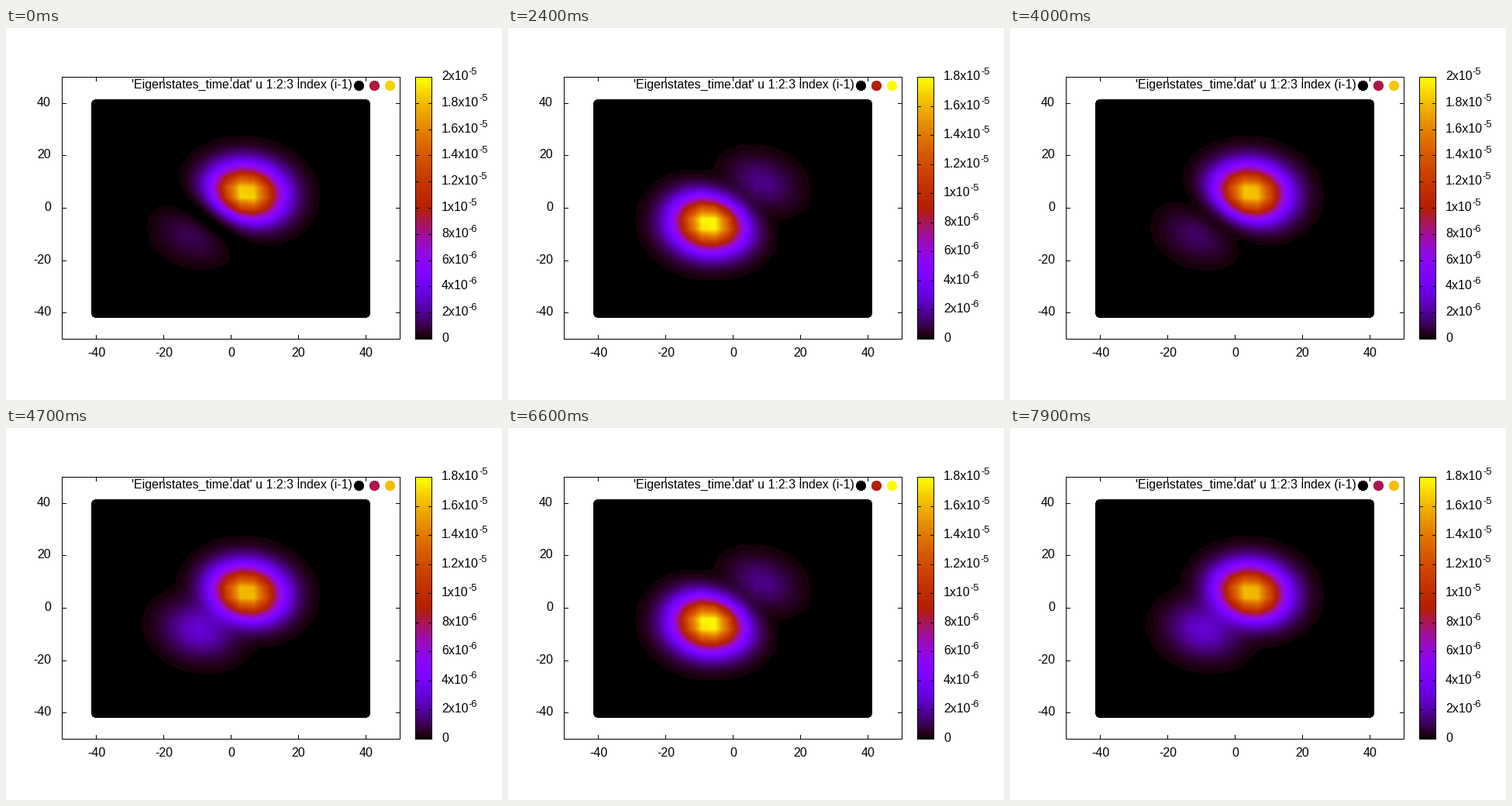
Recreate the animation shown at these times as a matplotlib script. Size 640 by 480 pixels, loop 8 s.

```python
import numpy as np
import matplotlib.pyplot as plt
from matplotlib.animation import FuncAnimation
from matplotlib.patches import Circle, Rectangle

W, H, DPI = 640, 480, 100
FRAMES, INTERVAL, PERIOD = 80, 100, 42
LEFT, RIGHT, TOP, BOTTOM = 72, 508, 63, 401
BAR_L, BAR_R = 528, 549
PEAK, STEP = 1.873e-5, 2e-6
LEVELS = 128
PX = 72 / DPI

plt.rcParams["font.family"] = "Liberation Sans"


def to_px(x):
    return LEFT + (x + 50) * (RIGHT - LEFT) / 100


def to_py(y):
    return BOTTOM - (y + 50) * (BOTTOM - TOP) / 100


def palette(v):
    """Black - violet - red - yellow ramp in discrete levels."""
    v = np.clip(np.floor(np.asarray(v) * LEVELS) / (LEVELS - 1), 0, 1)
    blue = np.clip(np.sin(2 * np.pi * v), 0, 1)
    return np.stack([np.sqrt(v), v ** 3, blue], axis=-1)


def well_state(x, y):
    """State localised in the upper right well, with a weak opposite lobe."""
    u, v = (x + y) / np.sqrt(2), (x - y) / np.sqrt(2)
    main = np.exp(-((u - 6.4) ** 2 + v ** 2) / 206)
    lobe = np.exp(-((u + 8) ** 2 + v ** 2) / 214)
    return main - 0.4 * lobe


def hat(points, nodes):
    gap = nodes[1] - nodes[0]
    return np.clip(1 - np.abs(points[:, None] - nodes) / gap, 0, 1)


# Density area in pixels; overlapping round markers shift the picture left
DOT = 6
x0, x1 = round(to_px(-40)), round(to_px(40))
y0, y1 = round(to_py(40)), round(to_py(-40))
cols = np.arange(x0 - DOT, x1 + DOT)
rows = np.arange(y0 - DOT + 1, y1 + DOT + 1)
data_x = np.clip((cols + 5.5 - to_px(0)) / 4.36, -40, 40)
data_y = np.clip((to_py(0) - rows) / 3.38, -40, 40)

nodes = np.arange(-40, 41, 4.0)
coarse = well_state(nodes[None, :], nodes[:, None])
wx, wy = hat(data_x, nodes), hat(data_y, nodes)
right = (wy @ coarse @ wx.T) ** 2
left = (wy @ coarse[::-1, ::-1] @ wx.T) ** 2
right *= PEAK / right.max()
left *= PEAK / left.max()


def overshoot(p):
    return np.maximum(0, np.maximum(p[0] + DOT - 0.5 - p, p - p[-1] + DOT - 0.5))


outside = np.hypot(overshoot(cols)[None, :], overshoot(rows)[:, None]) > DOT

fig = plt.figure(figsize=(W / DPI, H / DPI), dpi=DPI, facecolor="white")
ax = fig.add_axes([0, 0, 1, 1])
ax.set_axis_off()


def text(x, y, s, ha="left"):
    return ax.text(x, y, s, ha=ha, va="baseline", fontsize=16 * PX, color="black")


def line(xa, ya, xb, yb):
    """Straight one pixel line, both ends included."""
    xa, xb = sorted((xa, xb))
    ya, yb = sorted((ya, yb))
    return ax.add_patch(Rectangle((xa, ya), xb - xa + 1, yb - ya + 1, lw=0,
                                  fc="black", antialiased=False, snap=False,
                                  zorder=2.5))


def frame_box(xa, ya, xb, yb):
    for y in (ya, yb):
        line(xa, y, xb, y)
    for x in (xa, xb):
        line(x, ya, x, yb)


def picture(rgb, xa, xb, ya, yb):
    return ax.imshow(rgb, extent=(xa, xb, yb, ya), interpolation="nearest",
                     aspect="auto", zorder=1)


density = picture(np.ones(right.shape + (3,)),
                  cols[0], cols[-1] + 1, rows[0], rows[-1] + 1)
ramp = np.linspace(1, 0, BOTTOM - TOP + 1)[:, None]
picture(palette(ramp), BAR_L, BAR_R + 1, TOP, BOTTOM + 1)
ax.set_xlim(0, W)
ax.set_ylim(H, 0)

frame_box(LEFT, TOP, RIGHT, BOTTOM)
frame_box(BAR_L, TOP, BAR_R, BOTTOM)

TICK = 5
for value in range(-40, 41, 20):
    px, py = round(to_px(value)), round(to_py(value))
    line(px, BOTTOM, px, BOTTOM - TICK)
    line(px, TOP, px, TOP + TICK)
    line(LEFT, py, LEFT + TICK, py)
    line(RIGHT, py, RIGHT - TICK, py)
    text(px + 0.5, 424, str(value), "center")
    text(58, py + 4, str(value), "right")

text(447, 78, "'Eigenstates_time.dat' u 1:2:3 index (i-1)", "right")
key_dots = [ax.add_patch(Circle((x, 74.5), DOT, lw=0, fc="black",
                                antialiased=False, zorder=3))
            for x in (455.5, 475.5, 495.5)]


def bar_tick():
    label = text(562, 0, "")
    power = ax.annotate("", xy=(1, 0), xycoords=(label, "data"), ha="left",
                        va="baseline", fontsize=12.8 * PX, annotation_clip=False)
    return label, power, line(BAR_L, 0, BAR_L + 4, 0), line(BAR_R, 0, BAR_R - 4, 0)


bar_ticks = [bar_tick() for _ in range(11)]


def set_bar(count):
    for k, parts in enumerate(bar_ticks):
        for part in parts:
            part.set_visible(k <= count)
        if k > count:
            continue
        label, power, tick_l, tick_r = parts
        py = round(BOTTOM - k * (BOTTOM - TOP) / count)
        label.set_y(py + 4)
        power.xyann = (1, py - 3)
        if k == 0:
            label.set_text("0")
            power.set_visible(False)
        elif k < 5:
            label.set_text(f"{2 * k}x10")
            power.set_text("-6")
        else:
            label.set_text(f"{k / 5:g}x10")
            power.set_text("-5")
        for tick in (tick_l, tick_r):
            tick.set_y(py)


def update(i):
    share = (1 + np.cos(2 * np.pi * i / PERIOD)) / 2
    rho = share * right + (1 - share) * left
    top = rho.max()
    count = int(np.ceil(top / STEP))
    scale = count * STEP
    rgb = palette(rho / scale)
    rgb[outside] = 1
    density.set_data(rgb)
    for dot, part in zip(key_dots, (0, 0.5, 1)):
        dot.set_facecolor(tuple(palette(part * top / scale)))
    set_bar(count)
    return [density]


anim = FuncAnimation(fig, update, frames=FRAMES, interval=INTERVAL,
                     repeat=True, repeat_delay=0, blit=False)
plt.show()
```
